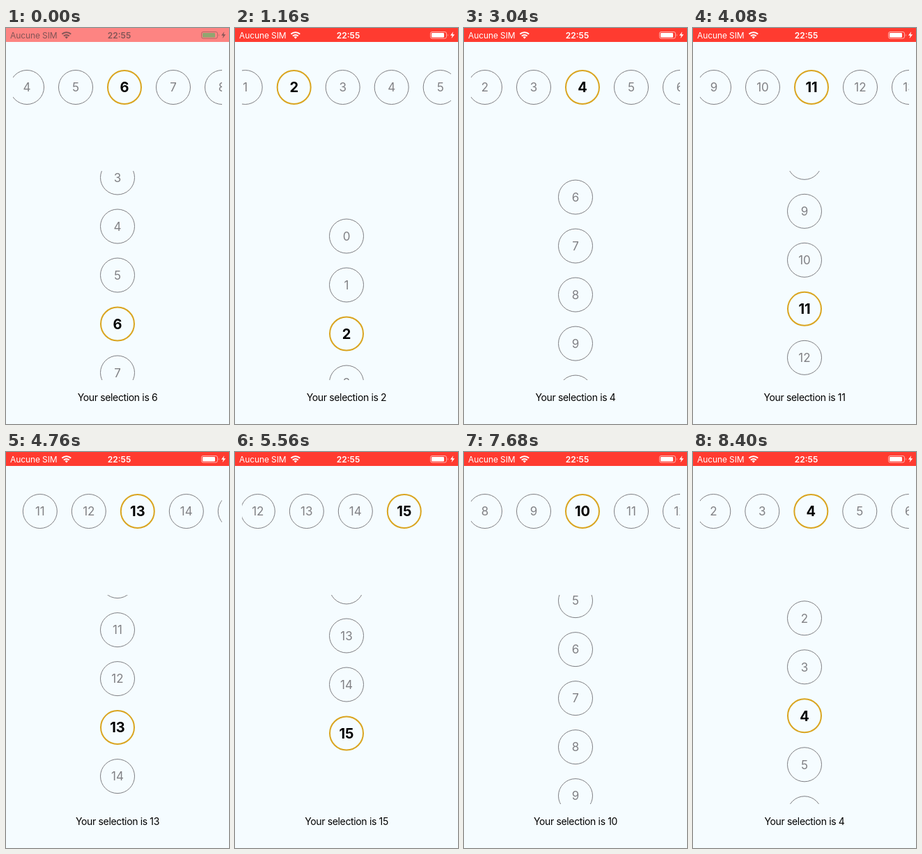
An HTML page for the animation above (8.44 s loop, 320 px wide and 568 px high).

```html
<!DOCTYPE html>
<html lang="fr">
<head>
<meta charset="utf-8">
<title>Number pickers</title>
<style>
html, body { margin: 0; width: 100%; height: 100%; overflow: hidden; background: #f5fcff; }
svg { display: block; width: 320px; height: 568px; font-family: Inter, sans-serif; }
.item circle { fill: none; stroke: #7f7f83; stroke-width: 1; }
.item text { font-size: 17px; fill: #808084; text-anchor: middle; }
.item.on circle { stroke: #daa520; stroke-width: 2; }
.item.on text { font-size: 20px; font-weight: 700; fill: #000; }
#label { font-size: 14px; letter-spacing: -.35px; text-anchor: middle; }
#status text { font-size: 12px; }
</style>
</head>
<body>
<svg viewBox="0 0 320 568">
  <defs>
    <clipPath id="rowClip"><rect x="10" y="50" width="300" height="70"/></clipPath>
    <clipPath id="colClip"><rect x="120" y="205" width="80" height="300"/></clipPath>
  </defs>
  <rect width="320" height="568" fill="#f5fcff"/>
  <rect id="bar" width="320" height="20"/>
  <g id="status">
    <text x="6" y="14.5" letter-spacing="-.1">Aucune SIM</text>
    <text x="162.5" y="14.5" font-weight="600" text-anchor="middle">22:55</text>
    <g fill="none" stroke="currentColor" stroke-width="2">
      <path d="M80.4 8.8a9 9 0 0 1 12.8 0M82.9 11.5a5.5 5.5 0 0 1 7.8 0"/>
    </g>
    <path d="M84.6 13.1a3.2 3.2 0 0 1 4.4 0L86.8 15.4Z"/>
    <rect x="280.5" y="5.5" width="23" height="9.5" rx="2.5" fill="none" stroke="currentColor" stroke-opacity=".6"/>
    <rect id="charge" x="282" y="7" width="18" height="6.5" rx="1.2"/>
    <path d="M305 8.5q1.6 1.7 0 3.4Z" fill-opacity=".6"/>
    <path d="M313.2 5.2L309 10.8H311.8L310.6 15L315.2 9.2H312.2Z"/>
  </g>
  <g id="row" clip-path="url(#rowClip)"></g>
  <g id="col" clip-path="url(#colClip)"></g>
  <text id="label" x="160" y="535"></text>
</svg>
<script>
const LOOP = 8440, STEP = 70, COUNT = 16;
const $ = id => document.getElementById(id);

// [start, end, position reached]
const flicks = [
  [520, 960, .8], [1440, 1790, .2], [2104, 2390, 3.3], [2880, 3305, 10.3],
  [4080, 4525, 12.42], [5000, 5410, 14.3], [6560, 6970, 9.24], [7560, 8100, 3.66]
];
// [start, end, item picked]
const picks = [
  [971, 1271, 2], [1795, 2095, 1], [2395, 2695, 4], [3305, 3605, 11],
  [4530, 4830, 13], [5415, 5715, 15], [6975, 7275, 10], [8108, 8408, 4]
];

const easeOut = p => 1 - (1 - p) ** 2;
const easeInOut = p => p * p * (3 - 2 * p);
const clamp = p => Math.min(1, Math.max(0, p));

function track(steps, start, ease, t) {
  let pos = start;
  for (const [a, b, to] of steps) {
    if (t < a) break;
    pos += (to - pos) * ease(clamp((t - a) / (b - a)));
  }
  return pos;
}

function add(parent, tag, attrs) {
  const el = document.createElementNS("http://www.w3.org/2000/svg", tag);
  for (const k in attrs) el.setAttribute(k, attrs[k]);
  return parent.appendChild(el);
}

function buildList(parent) {
  return Array.from({ length: COUNT }, (_, i) => {
    const g = add(parent, "g", { class: "item" });
    const circle = add(g, "circle", { r: 24.5 });
    const text = add(g, "text", { y: 6.2 });
    text.textContent = i;
    return { g, circle, text };
  });
}

const row = buildList($("row")), col = buildList($("col"));
let shown = -1;

function select(n) {
  if (n === shown) return;
  shown = n;
  for (const list of [row, col]) list.forEach(({ g, circle, text }, i) => {
    const on = i === n;
    g.classList.toggle("on", on);
    circle.setAttribute("r", on ? 24 : 24.5);
    text.setAttribute("y", on ? 7.3 : 6.2);
  });
  $("label").textContent = "Your selection is " + n;
}

function mix(a, b, p) {
  return `rgb(${a.map((v, i) => Math.round(v + (b[i] - v) * p))})`;
}

function drawStatus(t) {
  const p = clamp((t - 10) / 190), white = [255, 255, 255];
  const ink = mix([130, 85, 86], white, p);
  $("bar").setAttribute("fill", mix([253, 132, 130], [255, 59, 48], p));
  $("status").setAttribute("fill", ink);
  $("status").style.color = ink;
  $("charge").setAttribute("fill", mix([145, 165, 112], white, p));
}

function draw(t) {
  const h = track(picks, 6, easeInOut, t);
  const v = track(flicks, 5, easeOut, t);
  select(picks.reduce((n, [a, , to]) => t >= a ? to : n, 6));
  row.forEach(({ g }, i) => g.setAttribute("transform", `translate(${170 + STEP * (i - h)} 85)`));
  col.forEach(({ g }, i) => g.setAttribute("transform", `translate(160 ${354.5 + STEP * (i - v)})`));
  drawStatus(t);
}

const begin = performance.now();
function tick(now) {
  draw(Math.max(0, now - begin) % LOOP);
  requestAnimationFrame(tick);
}
draw(0);
requestAnimationFrame(tick);
</script>
</body>
</html>
```
